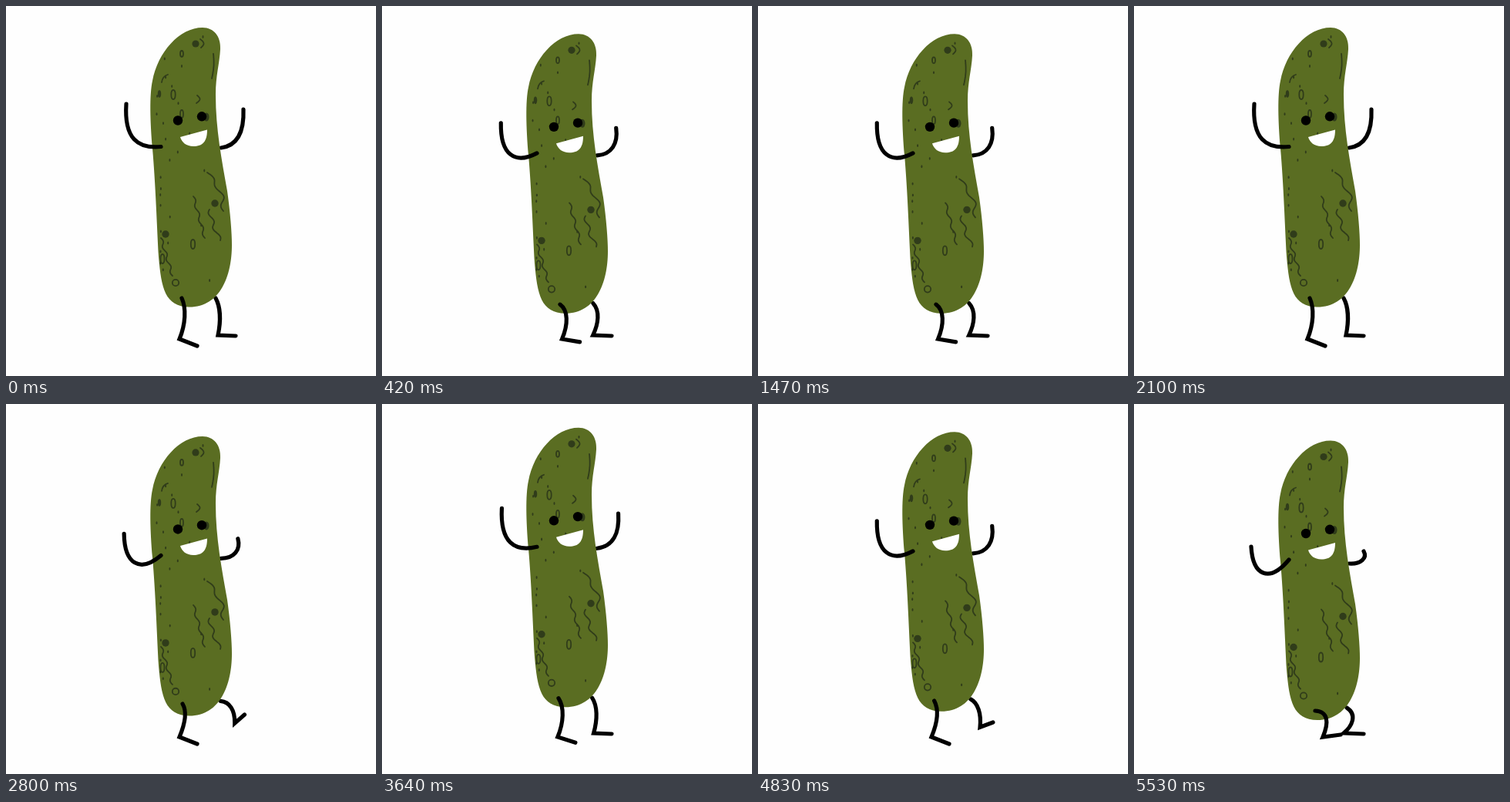
Write an HTML page that moves like this. It is 480 px wide and 480 px high and loops after 5.6 s.

```html
<!DOCTYPE html>
<html lang="en">
<head>
<meta charset="utf-8">
<title>Dancing pickle</title>
<style>
html, body { margin: 0; width: 100%; height: 100%; overflow: hidden; background: #fefefe; }
svg { display: block; width: 100%; height: 100%; }
.limb { fill: none; stroke: #000; stroke-width: 5.2; stroke-linecap: round; stroke-linejoin: miter; }
.lines { fill: none; stroke: #303c1a; stroke-width: 1.8; stroke-linecap: round; stroke-linejoin: round; }
.spots { fill: #303c1a; }
</style>
</head>
<body>
<svg viewBox="0 0 480 480">
  <defs>
    <path id="skin" d="M255 28C270 28 279 40 278 56C277 75 272 90 272 115C272 160 280 200 287 240C291 268 293 295 293 310C293 350 278 390.500 238 390.500C206 390 201.500 366 198 325C196 290 194 230 190 185C187 150 186 115 190 97C197 60 225 28 255 28Z"/>
    <clipPath id="inside"><use href="#skin"/></clipPath>
  </defs>
  <path id="armR" class="limb"/>
  <path id="legR" class="limb"/>
  <g id="body">
    <use href="#skin" fill="#5a6d22"/>
    <g clip-path="url(#inside)">
      <path id="wrinkles" class="lines"/>
      <g id="rings" class="lines"></g>
      <g id="spots" class="spots"></g>
    </g>
    <circle cx="223" cy="148.500" r="6.200"/>
    <circle cx="254" cy="143.300" r="6.200"/>
    <path fill="#fff" d="M226 170L261 160.500C261 176 255 182 243 182C234 182 228 177 226 170Z"/>
  </g>
  <path id="armL" class="limb"/>
  <path id="legL" class="limb"/>
</svg>
<script>
const STEP = 70, LOOP = 5600, BEAT = 7.5, DIP = 19.5;
const $ = id => document.getElementById(id);

let seed = 7;
const random = () => (seed = seed * 16807 % 2147483647) / 2147483647;

const oval = (x, y, rx, ry = rx) => `<ellipse cx="${x}" cy="${y}" rx="${rx}" ry="${ry}"/>`;

// A wavy line down the skin that may also bow to one side.
function squiggle(x, y, dx, dy, waves, amp, bow = 0) {
  let d = "";
  for (let i = 0; i <= 30; i++) {
    const t = i / 30;
    const side = amp * Math.sin(2 * Math.PI * waves * t) + bow * Math.sin(Math.PI * t);
    d += `${i ? "L" : "M"}${(x + dx * t + side).toFixed(1)} ${(y + dy * t).toFixed(1)}`;
  }
  return d;
}

function drawSkin() {
  $("wrinkles").setAttribute("d",
    squiggle(261, 216, 21, 50, 2, 3, 6) +
    squiggle(243, 247, 15, 54, 3, 1.8) +
    squiggle(264, 264, 14, 40, 2, -2.5, -2) +
    squiggle(201, 301, 15, 49, 3, 1.8) +
    squiggle(252, 43, 1, 11, 0.5, 4) +
    squiggle(248, 116, -1, 10, 0.5, 4) +
    squiggle(269, 62, -2, 32, 0.5, 1.5) +
    "M202 99Q203 91 210 89");
  $("rings").innerHTML =
    oval(217, 115, 2.7, 6) + oval(242.5, 309, 2.7, 6) + oval(203, 328, 2.5, 6) +
    oval(228, 140, 2, 5) + oval(228, 62, 2, 4) + oval(220, 359, 4.2);
  let dots = oval(246, 49, 4.6) + oval(271, 256, 4.7) + oval(207, 296, 4.7) +
    oval(199, 114, 2.2, 4.8) + oval(260, 144, 3.5, 5.5);
  // Small flecks gather towards the left side.
  for (let i = 0; i < 28; i++) {
    const y = 40 + 12 * i + 6 * random();
    const x = 192 + y / 40 + 80 * random() ** 3;
    dots += oval(x.toFixed(1), y.toFixed(1), 1, 1.9);
  }
  $("spots").innerHTML = dots;
}

const shift = ([x, y], dx, dy) => [x + dx, y + dy];

function curve(id, a, b, c, d, end) {
  const toe = end ? "L" + end : "";
  $(id).setAttribute("d", `M${a}C${b} ${c} ${d}${toe}`);
}

// k: 0 standing tall, 1 at the bottom of the dip.
function drawArms(k) {
  const handL = [156 - 4 * k, 127 + 58 * k], shoulderL = [201, 182.5 + 19.5 * k];
  curve("armL", handL, shift(handL, -3 + 5 * k, 45 - 8 * k),
    shift(shoulderL, 4 * k - 30, 3 + 28 * k), shoulderL);

  const handR = [308 - 10 * k, 134 + 57 * k], shoulderR = [279, 184 + 23 * k];
  curve("armR", handR, shift(handR, 1 + 4 * k, 28 - 19 * k),
    shift(shoulderR, 22 - 7 * k, 4 * k - 3), shoulderR);
}

function drawLegs(k, kick) {
  const slide = kick ? 0 : k, lift = kick ? k : 0;

  const hipL = [228 + 1.5 * k + 5.5 * slide, 379 + 14 * k + 5 * slide];
  const heelL = [225 + 20 * slide, 432];
  curve("legL", hipL, shift(hipL, 6 + 11 * slide, 13 - 4 * k - 8 * slide),
    shift(heelL, 8, -19), heelL, shift(heelL, 23, 9 - 12 * slide));

  const hipR = [272 + 4 * k + 5 * lift, 379 + 15 * k - 6 * lift];
  const heelR = [275 - 3 * k + 33.4 * lift, 427 - 18 * lift];
  curve("legR", hipR, shift(hipR, 6 + 8 * k, 11 - 2 * k - 12 * lift),
    shift(heelR, 4 + 7 * k - 12 * lift, 10 * k - 19 - 7 * lift),
    heelR, shift(heelR, 23 + 3 * k - 17.4 * lift, 1 - 17 * lift));
}

// Two equal bobs; the right foot kicks up on the second.
function draw(ms) {
  const beat = Math.floor((ms % LOOP) / STEP) % (2 * BEAT);
  const q = beat % BEAT;
  const k = Math.min(q, BEAT - q) / 3.5;
  $("body").setAttribute("transform", `translate(0 ${(DIP * k).toFixed(2)})`);
  drawArms(k);
  drawLegs(k, beat >= BEAT);
}

drawSkin();
const start = performance.now();
function tick() {
  draw(performance.now() - start);
  requestAnimationFrame(tick);
}
tick();
</script>
</body>
</html>
```
